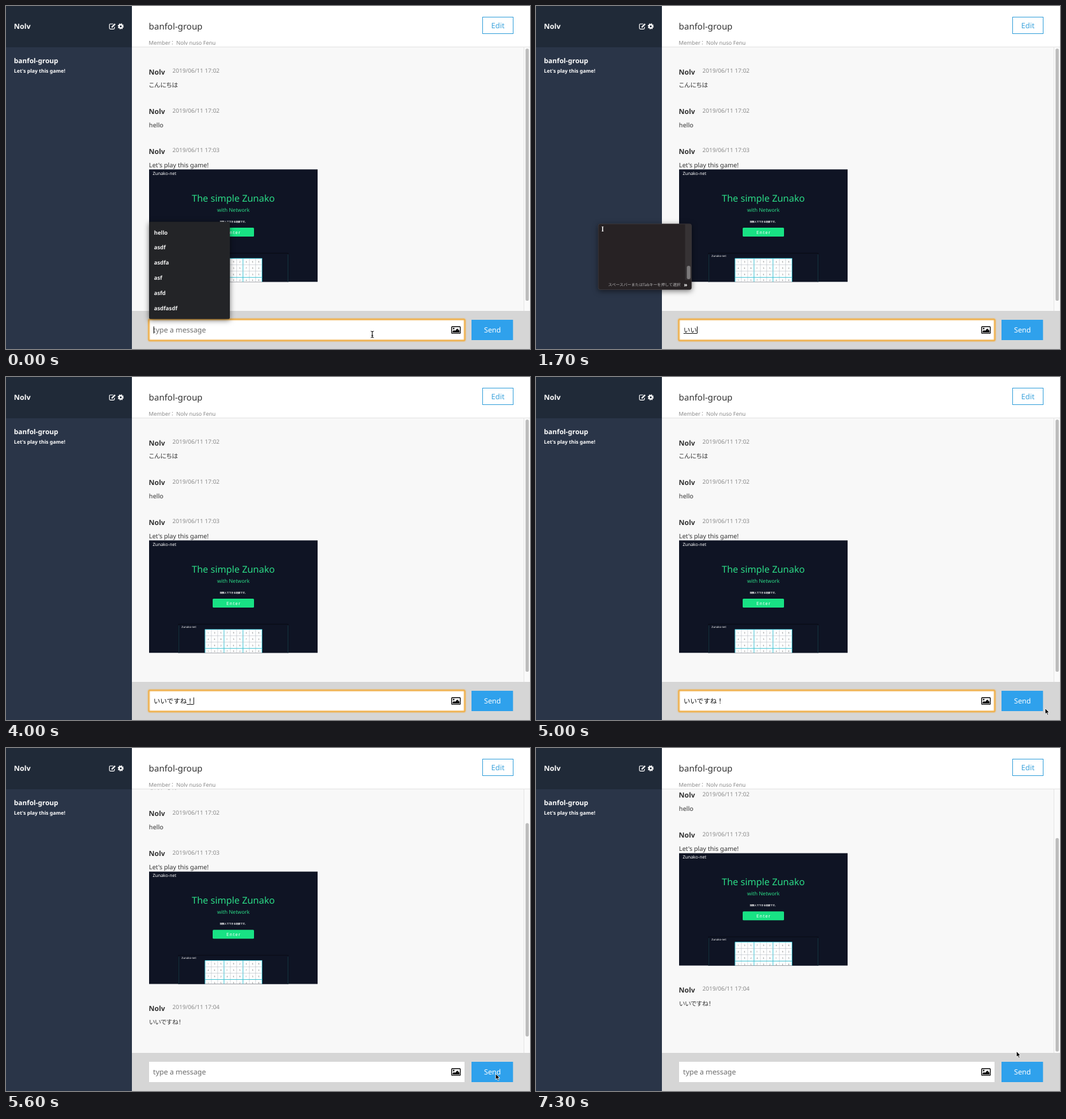
These frames come from a looping animation (824 px wide and 540 px high, 7.7 s). An HTML page:

```html
<!DOCTYPE html>
<html lang="ja">
<head>
<meta charset="utf-8">
<title>Chat</title>
<style>
  html, body { margin: 0; width: 100%; height: 100%; overflow: hidden; background: #f8f8f8; }
  svg { display: block; width: 824px; height: 540px; }
  text { font-family: 'Noto Sans', 'Noto Sans CJK JP', sans-serif; text-rendering: geometricPrecision; white-space: pre; }
  .b { font-weight: 700; }
  .sb { font-weight: 600; }
  .w { fill: #fff; }
  .name { font-size: 11.1px; font-weight: 700; fill: #333; }
  .date { font-size: 9.1px; fill: #8a8a8a; }
  .body { font-size: 9.85px; fill: #333; font-feature-settings: 'palt'; }
  .mid { text-anchor: middle; }
  .ring { fill: none; stroke: #efb04c; stroke-width: 2; filter: drop-shadow(0 0 1px #efb04c); }
  .cand { font: 700 10.5px 'Noto Serif CJK JP', 'Noto Serif', 'Noto Sans CJK JP', serif; fill: #fff; }
  .shadow { filter: drop-shadow(0 2px 4px #0008); }
</style>
</head>
<body>
<svg viewBox="0 0 824 540">
  <defs>
    <clipPath id="view"><rect x="198" y="65" width="616" height="415"/></clipPath>
    <clipPath id="shot"><rect x="225" y="257.3" width="265" height="177"/></clipPath>
  </defs>

  <rect x="198" width="626" height="540" fill="#f8f8f8"/>
  <g clip-path="url(#view)"><g id="feed"></g></g>
  <rect x="814" y="65" width="10" height="415" fill="#fafafa"/>
  <path d="M814.5 65V480" stroke="#e6e6e6"/>
  <rect id="thumb" x="817" width="5.2" rx="2.6" fill="#bdbdbd"/>

  <rect x="198" width="626" height="65" fill="#fff"/>
  <path d="M198 64.5H824" stroke="#e4e4e4"/>
  <text x="224.6" y="37.3" font-size="13.7" fill="#333">banfol-group</text>
  <g font-size="8.5" fill="#888">
    <text x="224.6" y="61">Member</text>
    <text x="257.5" y="61">：</text>
    <text x="267.8" y="61">Nolv nuso Fenu</text>
  </g>
  <rect x="749.5" y="17.5" width="48" height="26" fill="#fff" stroke="#3ba3dc"/>
  <text class="mid" x="773.5" y="35" font-size="11.7" fill="#3ba3dc">Edit</text>

  <rect width="198" height="540" fill="#2a3548"/>
  <rect width="198" height="65" fill="#202a38"/>
  <text class="b w" x="12.6" y="36" font-size="11.3">Nolv</text>
  <g fill="none" stroke="#fff" stroke-width="1.1">
    <path d="M168.5 28.2H164.2Q162.6 28.2 162.6 29.8V34.8Q162.6 36.4 164.2 36.4H169Q170.6 36.4 170.6 34.8V33"/>
    <path d="M166.2 33.6L171.6 28.2" stroke-width="2.2"/>
    <circle cx="180.4" cy="32" r="2.6" stroke-width="2.2"/>
    <circle cx="180.4" cy="32" r="4" stroke-width="1.5" stroke-dasharray="1.57"/>
  </g>
  <text class="b w" x="12.6" y="89.7" font-size="10.7">banfol-group</text>
  <text class="b w" x="12.6" y="105.3" font-size="7.9">Let's play this game!</text>

  <rect x="198" y="480" width="626" height="60" fill="#d6d6d6"/>
  <rect x="225" y="494" width="496" height="32" fill="#fff"/>
  <rect id="inputRing" class="ring" x="224.5" y="493.3" width="497" height="33.4" rx="1.5"/>
  <text id="hint" x="231.3" y="514" font-size="11.35" fill="#6c6c6c">type a message</text>
  <text id="typed" x="232" y="513.7" font-size="10.5" fill="#111" style="font-family:'Noto Sans CJK JP',sans-serif"></text>
  <path id="under" stroke="#222" stroke-width="1"/>
  <path id="caret" stroke="#111" stroke-width="1"/>
  <g>
    <rect x="700.8" y="504.8" width="13.6" height="10.6" rx="1.2" fill="#fff" stroke="#111" stroke-width="1.4"/>
    <circle cx="704" cy="507.8" r="1.3" fill="#111"/>
    <path d="M702.3 514V512.3L704.6 510L706 511.4L709.6 507.7L713 511V514Z" fill="#111"/>
  </g>
  <rect x="732" y="494" width="65.3" height="32" fill="#2fa1ec"/>
  <rect id="sendRing" class="ring" x="731" y="493" width="67.5" height="34" rx="1.5"/>
  <text class="mid w" x="765" y="514" font-size="11.3">Send</text>

  <g id="menu">
    <rect class="shadow" x="225" y="339.8" width="127" height="153" rx="2" fill="#232427"/>
  </g>

  <g id="ime">
    <rect class="shadow" x="98" y="343" width="146.5" height="103.5" rx="3" fill="#272224" stroke="#4a4648" stroke-width=".6"/>
    <path d="M234.5 343.4H241.5Q244.2 343.4 244.2 346V431.5H234.5Z" fill="#363234"/>
    <rect id="imeThumb" x="237.2" width="5.6" rx="2.8" fill="#7b797a"/>
    <text id="c0" class="cand" x="102.5" y="355"></text>
    <text id="c1" class="cand" x="102.5" y="372.6"></text>
    <text x="113.6" y="441.3" font-size="6.15" fill="#b5b3b4">スペースバーまたはTabキーを押して選択</text>
    <text class="b w" x="232.4" y="441.8" font-size="9">»</text>
  </g>

  <path id="beam" d="M-2.4 -5Q0 -5 0 -3.6Q0 -5 2.4 -5M0 -3.8V3.8M-2.4 5Q0 5 0 3.6Q0 5 2.4 5M-1.3 1.6H1.3" fill="none" stroke="#111" stroke-width="1.1"/>
  <path id="arrow" d="M0 0V9L2.1 7.1L3.6 10.5L5.2 9.8L3.7 6.5H6.5Z" fill="#000" stroke="#fff" stroke-width=".8"/>
</svg>
<script>
const LOOP = 7700, STEP = 100, SENT = 5600, FIRST_KEY = 1300, MOUSE_BACK = 4400;
const $ = id => document.getElementById(id);
const show = (el, on) => el.setAttribute('visibility', on ? 'visible' : 'hidden');
const text = (x, y, s, attrs = '') => `<text x="${x}" y="${y}" ${attrs}>${s}</text>`;
const place = (el, x, y) => el.setAttribute('transform', `translate(${x} ${y})`);

function message(y, time, body) {
  return text(224.6, y + 7.5, 'Nolv', 'class="name"') +
    text(261.8, y + 4.8, '2019/06/11 ' + time, 'class="date"') +
    text(224.8, y + 28, body, 'class="body"');
}

function board() {
  const x0 = 313, y0 = 397.4, cell = 9.95;
  let s = `<rect x="${x0}" y="${y0}" width="${cell * 9}" height="40" fill="#fff"/>`;
  const line = (d, strong) =>
    `<path d="${d}" stroke="${strong ? '#43c3d3' : '#b9bfc6'}" stroke-width="${strong ? 1 : .6}"/>`;
  for (let i = 0; i < 10; i++) s += line(`M${x0 + i * cell} ${y0}v40`, i % 3 === 0);
  for (let r = 0; r < 4; r++) {
    s += line(`M${x0} ${y0 + r * cell}h${cell * 9}`, r % 3 === 0);
    for (let c = 0; c < 9; c++)
      s += text(x0 + (c + .5) * cell, y0 + r * cell + 6.2, (c * 2 + r * 3) % 9 + 1, 'class="mid" font-size="3.4" fill="#555"');
  }
  return s;
}

function preview() {
  return `<g clip-path="url(#shot)">
    <rect x="225" y="257" width="265" height="178" fill="#0f1424"/>` +
    text(230.8, 266.3, 'Zunako-net', 'class="w" font-size="6.9"') +
    text(357.5, 307.5, 'The simple Zunako', 'class="mid" font-size="14.7" fill="#2bdc87"') +
    text(357.5, 323.8, 'with Network', 'class="mid" font-size="8.1" fill="#2bdc87"') +
    text(357.5, 341.3, '複数人でできる遊戯です。', 'class="mid b w" font-size="3.6"') +
    `<rect x="325" y="349" width="65" height="14" rx="1.5" fill="#18e284"/>` +
    text(358, 358.6, 'Enter', 'class="mid w" font-size="7" letter-spacing="1"') +
    `<path d="M271.5 440V389.2H443.5V440" fill="#0f1424" stroke="#0a0d18" stroke-width="1.4"/>
    <path d="M271.8 391V440M443.4 391V440" stroke="#1c4350" stroke-width=".8"/>` +
    text(276, 394.6, 'Zunako-net', 'class="w" font-size="4.3"') + board() + '</g>';
}

$('feed').innerHTML = message(100, '17:02', 'こんにちは') + message(162.8, '17:02', 'hello') +
  message(225.6, '17:03', "Let's play this game!") + preview() +
  `<g id="reply">${message(469.5, '17:04', 'いいですね！')}</g>`;

$('menu').innerHTML += ['hello', 'asdf', 'asdfa', 'asf', 'asfd', 'asdfasdf']
  .map((s, i) => text(232.7, 359.6 + i * 23.8, s, 'class="sb" font-size="8.7" fill="#f2f2f2"')).join('');

// time, text, length already confirmed, candidates (null: window closed)
const keys = [
  [0, '', 0, null],
  [FIRST_KEY, 'い', 0, []],
  [1400, 'い', 0, ['い', '良い']],
  [1700, 'いい', 0, ['I']],
  [1900, 'いい', 0, ['良い', 'いい']],
  [2300, 'いいd', 0, ['良い', 'いい']],
  [2400, 'いいで', 0, ['良いで', 'いいで']],
  [2700, 'いいでs', 0, ['良いで', 'いいで']],
  [2800, 'いいです', 0, ['良いです', 'いいですね']],
  [3100, 'いいですn', 0, ['良いです', 'いいですね']],
  [3200, 'いいですね', 0, ['いいですね', '良いですね']],
  [3600, 'いいですね', 5, null],
  [4000, 'いいですね！', 5, null],
  [4200, 'いいですね！', 6, null],
  [SENT, '', 0, null]
];
const mouse = [
  [0, 576, 517], [MOUSE_BACK, 576, 517], [4600, 690, 518], [4800, 814, 521], [4900, 816, 526],
  [5200, 770, 513], [5600, 770, 513], [6000, 755.5, 477.5]
];
const scroll = [[0, 0], [SENT - 1, 0], [SENT, 62.8], [6000, 62.8], [6300, 91.8]];

function tween(list, t, k) {
  const i = list.findIndex(p => p[0] > t);
  if (i < 0) return list[list.length - 1][k];
  const a = list[i - 1], b = list[i];
  return a[k] + (b[k] - a[k]) * (t - a[0]) / (b[0] - a[0]);
}

function draw(t) {
  const [since, str, done, cands] = keys.filter(k => k[0] <= t).pop();
  const typed = $('typed'), focused = t < 5400, sent = t >= SENT;
  typed.textContent = str;
  const end = 232 + (str ? typed.getComputedTextLength() : 0);
  const start = 232 + (done ? typed.getSubStringLength(0, done) : 0);
  show($('hint'), !str);
  $('under').setAttribute('d', done < str.length ? `M${start} 515.5H${end}` : '');
  $('caret').setAttribute('d', `M${end + .5} 504.5V515.5`);
  show($('caret'), focused && (t - since) % 1000 < 500);
  show($('inputRing'), focused);
  show($('sendRing'), !focused && !sent);

  show($('menu'), t < FIRST_KEY);
  show($('ime'), cands);
  const list = cands || [];
  $('c0').textContent = list[0] || '';
  $('c1').textContent = list[1] || '';
  const top = list.length > 1 ? 403 : 409;
  $('imeThumb').setAttribute('y', top);
  $('imeThumb').setAttribute('height', 430 - top);

  const y = tween(scroll, t, 1);
  place($('feed'), 0, -y);
  show($('reply'), sent);
  $('thumb').setAttribute('y', 67 + y * .815);
  $('thumb').setAttribute('height', sent ? 336 : 397);

  const mx = tween(mouse, t, 1), my = tween(mouse, t, 2);
  const visible = t < FIRST_KEY || t >= MOUSE_BACK, inField = mx < 721;
  show($('beam'), visible && inField);
  show($('arrow'), visible && !inField);
  place($('beam'), mx, my);
  place($('arrow'), mx, my);
}

function tick() {
  draw(Math.floor(performance.now() % LOOP / STEP) * STEP);
  requestAnimationFrame(tick);
}
tick();
</script>
</body>
</html>
```
